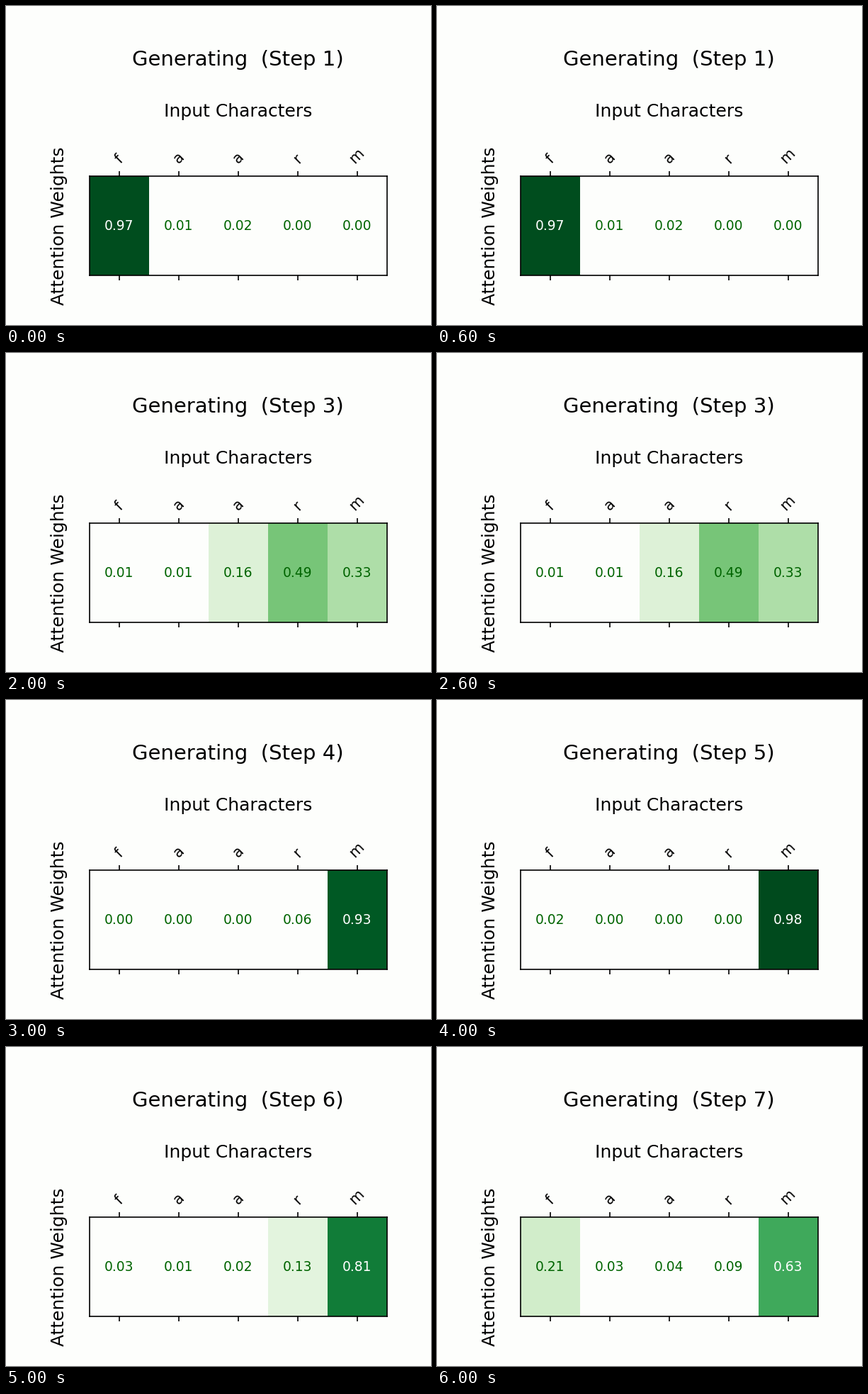
Recreate the animation shown at these times as a matplotlib script. Size 600 by 450 pixels, loop 7000 ms.

```python
import matplotlib.pyplot as plt
import numpy as np
from matplotlib.animation import FuncAnimation

W, H, DPI = 600, 450, 150
LEFT, RIGHT, TOP, BOTTOM = 117.75, 537.5, 240.1, 380.2
PAPER = "#fdfefc"
FAINT = 0.12  # weights below this stay the colour of the paper
LETTERS = "faarm"

# Each step: the attended letter, and the weight that leaks to the others.
STEPS = [
    (0, {1: 0.01, 2: 0.02}),
    (2, {1: 0.014, 3: 0.204, 4: 0.114}),
    (3, {0: 0.01, 1: 0.01, 2: 0.16, 4: 0.33}),
    (4, {2: 0.004, 3: 0.064}),
    (4, {0: 0.02}),
    (4, {0: 0.03, 1: 0.01, 2: 0.02, 3: 0.13}),
    (4, {0: 0.21, 1: 0.03, 2: 0.04, 3: 0.09}),
]

plt.rcParams["font.family"] = "DejaVu Sans"
fig = plt.figure(figsize=(W / DPI, H / DPI), dpi=DPI, facecolor=PAPER)
ax = fig.add_axes([LEFT / W, 1 - BOTTOM / H,
                   (RIGHT - LEFT) / W, (BOTTOM - TOP) / H], facecolor=PAPER)


def heading(text, baseline, size):
    return fig.text((LEFT + RIGHT) / 2 / W, 1 - baseline / H, text,
                    fontsize=size, ha="center", va="baseline")


def attention(step):
    """Weights of one step; the attended letter takes what is left of 1."""
    peak, leaks = STEPS[step]
    row = np.zeros(len(LETTERS))
    for i, weight in leaks.items():
        row[i] = weight
    row[peak] = 1 - row.sum()
    return row


def visible(row):
    return np.ma.masked_less(row, FAINT)[np.newaxis, :]


title = heading("", 84, 14)
heading("Input Characters", 156, 12)
ax.set_ylabel("Attention Weights", fontsize=12, labelpad=14.8)

heat = ax.imshow(visible(attention(0)), cmap="Greens", vmin=0, vmax=1,
                 aspect="auto", interpolation="nearest")
ax.set_xticks(range(len(LETTERS)), list(LETTERS))
ax.set_yticks([])
ax.tick_params(axis="x", top=True, bottom=True, labeltop=True,
               labelbottom=False, labelrotation=45, labelsize=10)
values = [ax.text(i, 0, "", fontsize=9, ha="center", va="center")
          for i in range(len(LETTERS))]


def draw(step):
    row = attention(step)
    title.set_text(f"Generating  (Step {step + 1})")
    heat.set_data(visible(row))
    for label, weight in zip(values, row):
        label.set_text(f"{weight:.2f}")
        label.set_color("white" if weight > 0.5 else "darkgreen")
    return [title, heat, *values]


anim = FuncAnimation(fig, draw, frames=len(STEPS), interval=1000,
                     init_func=lambda: draw(0), repeat=True, repeat_delay=0)
plt.show()
```
